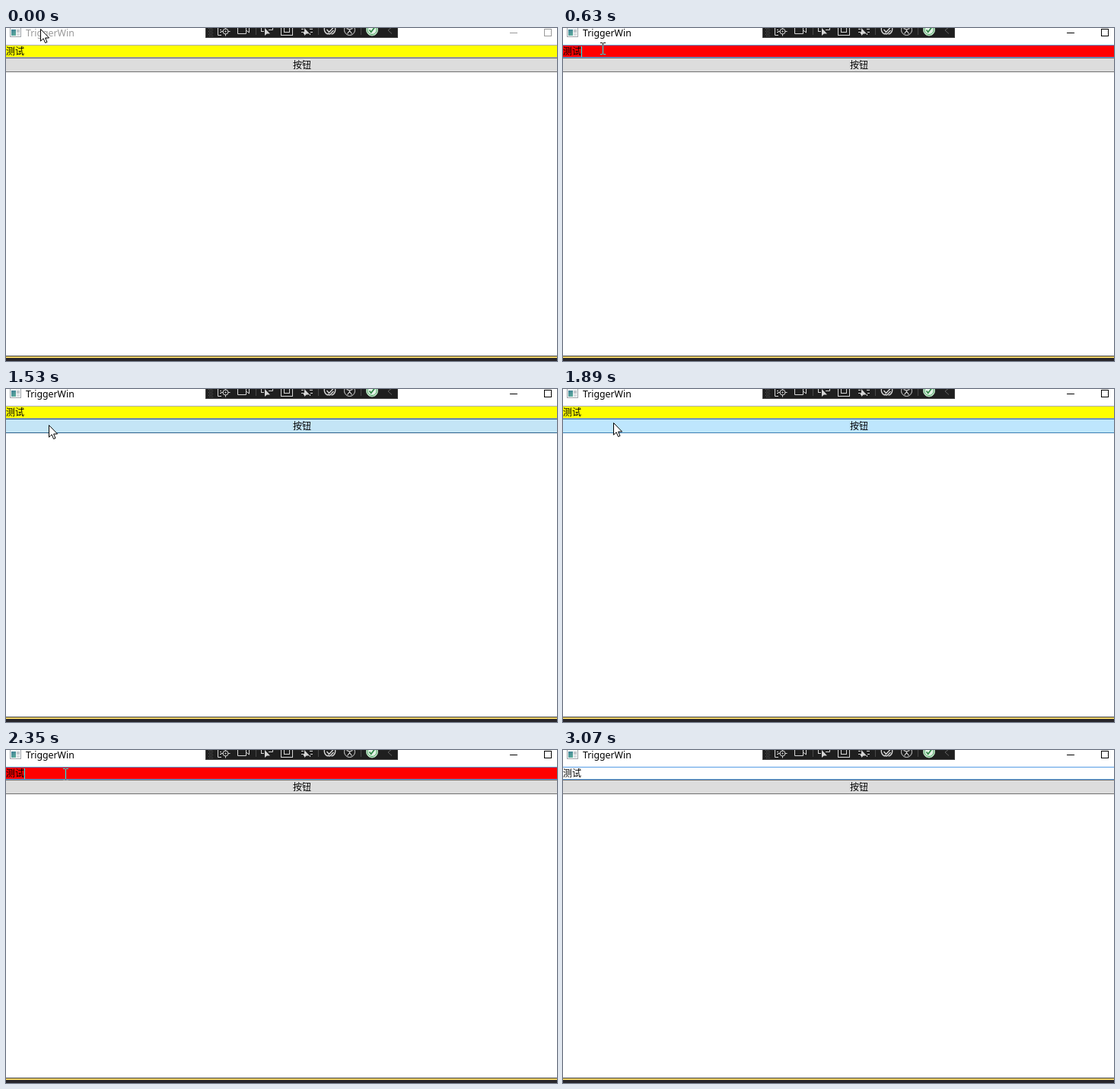
An HTML page with a canvas for the animation above (3160 ms loop, 724x437 px).

```html
<!DOCTYPE html>
<html lang="zh-CN">
<head>
<meta charset="utf-8">
<style>
  html, body { margin: 0; width: 100%; height: 100%; overflow: hidden; background: #fff; }
  canvas { display: block; }
</style>
</head>
<body>
<canvas id="stage" width="724" height="437"></canvas>
<script>
const ctx = document.getElementById('stage').getContext('2d');
const LOOP = 3160;
const CJK = '12px "Noto Sans CJK SC", "Noto Sans CJK", sans-serif';
const LATIN = '12.3px "Noto Sans", sans-serif';

// start ms, pointer kind, x, y, time the text box took focus, button held
const STEPS = [
  [0, 'arrow', 45, 1],
  [90, 'arrow', 47, 11],
  [180, 'beam', 51, 23],
  [270, 'beam', 52, 19],
  [630, 'beam', 52, 19, 630],
  [990, 'beam', 53, 25, 630],
  [1080, 'arrow', 55, 43, 630],
  [1170, 'arrow', 56, 47, 630],
  [1530, 'arrow', 56, 47, 0, true],
  [1620, 'arrow', 56, 47],
  [1890, 'arrow', 66, 44],
  [1980, 'beam', 75, 26],
  [2070, 'beam', 78, 26],
  [2240, 'beam', 78, 24],
  [2350, 'beam', 78, 24, 2350],
  [2710, 'beam', 79, 22, 2350],
  [2800, 'arrow', 80, 13, 2350],
  [2890, 'arrow', 83, 3, 2350],
  [2980, 'arrow', 86, -9, 2350],
  [3070, 'none', 0, 0, 2350]
];

function rect(color, x, y, w, h) {
  ctx.fillStyle = color;
  ctx.fillRect(x, y, w, h);
}

function frame(color, x, y, w, h) {
  ctx.strokeStyle = color;
  ctx.lineWidth = 1;
  ctx.strokeRect(x + .5, y + .5, w - 1, h - 1);
}

function text(str, x, y, color, font) {
  ctx.font = font;
  ctx.fillStyle = color;
  ctx.fillText(str, x, y);
}

function path(d, x, y, stroke, fill, width = 1) {
  const p = new Path2D(d);
  ctx.save();
  ctx.translate(x, y);
  ctx.lineWidth = width;
  if (fill) { ctx.fillStyle = fill; ctx.fill(p); }
  if (stroke) { ctx.strokeStyle = stroke; ctx.stroke(p); }
  ctx.restore();
}

function circle(x, y, r, stroke, fill) {
  path(`M${-r} 0a${r} ${r} 0 1 0 ${2 * r} 0a${r} ${r} 0 1 0 ${-2 * r} 0z`, x, y, stroke, fill);
}

function titleBar(active) {
  const ink = active ? '#000' : '#999';
  rect('#f4f6f7', 5, 0, 15, 12);
  frame('#a3a8ad', 5, -1, 15, 13);
  const pane = ctx.createLinearGradient(7, 2, 12, 10);
  pane.addColorStop(0, '#3f7f96');
  pane.addColorStop(1, '#5fae9c');
  rect(pane, 7, 2, 6, 8);
  rect('#c3c9cd', 14, 2, 4, 4);
  rect('#d9dde0', 14, 7, 4, 3);
  text('TriggerWin', 26, 11, ink, LATIN);
  rect(ink, 662, 6, 10, 1);
  frame(ink, 707, 1, 10, 10);
}

function toolbar() {
  const ink = '#d6d6d6', pointer = 'M0 0V10L2.8 7.5H7z';
  rect('#1f1f1f', 262, 0, 253, 13);
  frame('#424242', 262, -1, 253, 14);
  for (let y = 0; y < 11; y += 2)
    for (let x = 266 + y % 4 / 2; x < 272; x += 2) rect('#585858', x, y, 1, 1);

  path('M10 -1H.5V9.5H5M3 2.5H5M3 5.5H5', 278, 0, ink);
  circle(288.5, 4.5, 3.5, ink);
  path('M0 -6V-3M0 3V6M-6 0H-3M3 0H6', 288.5, 4.5, ink);
  circle(288.5, 4.5, 1, null, ink);
  path('M.5 -2V7.5H11.5V-2M11.5 3L15.5 6V-1', 304, 0, ink);
  path('M0 4.5H4M.5 4V0M10 2.5H15.5V-1', 335, 0, ink);
  path(pointer, 340, 0, null, ink);
  frame(ink, 361, -5, 16, 15);
  frame(ink, 365, -2, 8, 8);
  path('M0 1.5H3M0 5.5H3M11 1.5H15M12 5.5H15M3.5 5V8M11.5 7V9', 388, 0, ink);
  path(pointer, 392, 0, null, ink);
  path('M-7 -1C-8 3 -5 7 -2 7M7 -1C8 3 5 7 2 7M-4 1L-1 4.5L5 -2M-3 6L0 7L5 2', 425.5, 1, ink, null, 1.4);
  circle(451.5, 2.5, 7, ink);
  path('M-4 -1L0 .5L4 -1M0 0V2L-3 6M0 2L3 6', 451.5, 1.5, ink, null, 1.2);
  for (const x of [328, 410, 466]) rect('#484848', x, 0, 1, 9);
  circle(481, 2.5, 7.5, '#a9d8b4', '#e3f3e6');
  circle(481, 2.5, 6, '#45a15b');
  path('M-3 0L-.8 2.8L4 -3.5', 480.5, 2.5, '#2f8746', null, 1.7);
  path('M5 -1L0 3L5 7.5', 502, 0, '#626262');
}

function textBox(over, focused, caret) {
  const fill = over && focused ? '#f00' : over || focused ? '#fff' : '#ff0';
  const border = focused ? '#569de5' : over ? '#7eb4ea' : '#abadb3';
  rect(fill, 0, 22, 724, 17);
  rect(border, 0, 22, 724, 1);
  rect(border, 0, 38, 724, 1);
  text('测试', 0, 35, '#000', CJK);
  if (caret) invert(24, 24, 1, 14);
}

function button(over, held) {
  const fill = held ? '#c4e5f6' : over ? '#bee6fd' : '#ddd';
  const border = held ? '#2c628b' : over ? '#3c7fb1' : '#707070';
  rect(fill, 0, 39, 724, 19);
  rect(border, 0, 39, 724, 1);
  rect(border, 0, 57, 724, 1);
  text('按钮', 377, 53, '#000', CJK);
}

function invert(x, y, w, h) {
  ctx.globalCompositeOperation = 'difference';
  rect('#fff', x, y, w, h);
  ctx.globalCompositeOperation = 'source-over';
}

function drawPointer(kind, x, y) {
  if (kind === 'arrow')
    path('M.5 .5V16.2L4.1 12.8L6.6 18.5L9 17.5L6.6 12H11.6z', x, y, '#000', '#fff');
  if (kind === 'beam') {
    for (const end of [y, y + 15]) {
      invert(x - 3, end, 3, 1);
      invert(x + 1, end, 3, 1);
    }
    invert(x, y + 1, 1, 14);
  }
}

function draw(now) {
  const t = now % LOOP;
  const [, kind, x, y, focusedAt, held] = STEPS.findLast(step => step[0] <= t);
  rect('#fff', 0, 0, 724, 437);
  titleBar(t >= 630);
  toolbar();
  textBox(kind === 'beam', !!focusedAt, focusedAt && t - focusedAt < 530);
  button(kind === 'arrow' && y >= 39, held);
  rect('#3b3a3c', 0, 430, 724, 1);
  rect('#f2d568', 0, 431, 724, 2);
  rect('#28262b', 0, 433, 724, 4);
  drawPointer(kind, x, y);
  requestAnimationFrame(() => draw(performance.now()));
}

draw(0);
</script>
</body>
</html>
```
